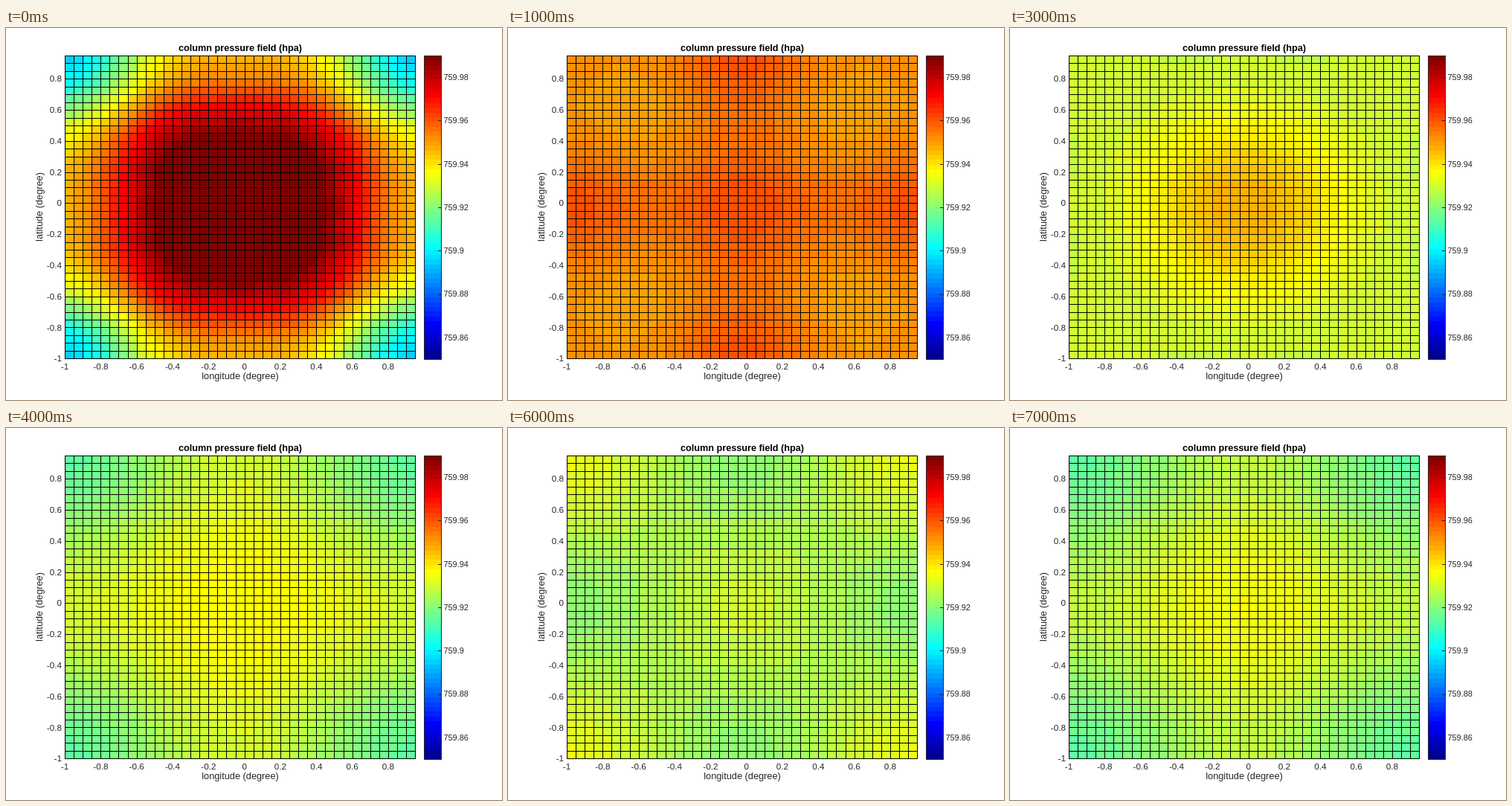
An HTML page with a canvas for the animation above (8 s loop, 667x500 px).

```html
<!DOCTYPE html>
<html lang="en">
<head>
<meta charset="utf-8">
<title>Column pressure field</title>
<style>
  html, body { margin: 0; width: 100%; height: 100%; overflow: hidden; background: #fff; }
  canvas { display: block; }
</style>
</head>
<body>
<canvas id="stage" width="667" height="500"></canvas>
<script>
const ctx = document.getElementById('stage').getContext('2d');
const STEP = 1000, STEPS = 8, CELLS = 39, LEVELS = 64;
const plot = { x: 79, y: 37, w: 471.2, h: 407.2 };
const bar = { x: 562, y: 37, w: 23, h: 408 };
const FONT = '"Liberation Sans", Arial, sans-serif';
const INK = '#262626';

const { PI, cos, exp, round, floor, min, max } = Math;
const cosDeg = degrees => cos(degrees * PI / 180);

// Rainbow from dark blue to dark red in 64 bands.
function jet(level) {
  const k = max(1, min(LEVELS, floor(level) + 1));
  const ramp = j => round(255 * max(0, min(1, j / 16, (48 - j) / 16)));
  return `rgb(${ramp(k - 24)},${ramp(k - 8)},${ramp(k + 8)})`;
}

// Damped standing waves in a square basin, in colour levels.
function pressureAt(t) {
  const mean = 34.8 + 15.2 * exp(-.17 * t * t);
  const axial = 13.3 / (1 + .65 * t) * cosDeg(107.5 * t - 25);
  const diagonal = 2.5 * (1 - exp(-t)) * cosDeg(116 * t + 10);
  const overtone = -5.5 * exp(-t) * cos(PI * t);
  return (x, y) => {
    const u = cos(PI * x), v = cos(PI * y);
    return mean + axial * (u + v) + diagonal * u * v + overtone * (u * u + v * v - 1);
  };
}

const gridX = i => round(plot.x + plot.w * i / CELLS);
const gridY = j => round(plot.y + plot.h * j / CELLS);

function text(str, x, y, size, { align = 'center', weight = '', color = INK, turn = 0 } = {}) {
  ctx.save();
  ctx.translate(x, y);
  ctx.rotate(turn);
  ctx.font = `${weight} ${size}px ${FONT}`;
  ctx.textAlign = align;
  ctx.fillStyle = color;
  ctx.fillText(str, 0, size * .35);
  ctx.restore();
}

function drawCells(step) {
  const pressure = pressureAt(step), middle = (CELLS - 1) / 2;
  for (let j = 0; j < CELLS; j++) {
    for (let i = 0; i < CELLS; i++) {
      ctx.fillStyle = jet(pressure((i - middle) / 20, (j - middle) / 20));
      ctx.fillRect(gridX(i), gridY(j), gridX(i + 1) - gridX(i), gridY(j + 1) - gridY(j));
    }
  }
}

function drawGrid() {
  const left = gridX(0), top = gridY(0);
  const width = gridX(CELLS) - left + 1, height = gridY(CELLS) - top + 1;
  ctx.fillStyle = '#000';
  for (let i = 0; i <= CELLS; i++) {
    ctx.fillRect(gridX(i), top, 1, height);
    ctx.fillRect(left, gridY(i), width, 1);
  }
}

function drawColorbar() {
  const edge = k => round(bar.y + bar.h * (1 - k / LEVELS));
  for (let k = 0; k < LEVELS; k++) {
    ctx.fillStyle = jet(k);
    ctx.fillRect(bar.x, edge(k + 1), bar.w, edge(k) - edge(k + 1));
  }
  ctx.strokeStyle = INK;
  ctx.lineWidth = 1;
  ctx.strokeRect(bar.x + .5, bar.y + .5, bar.w, bar.h);
  for (let n = 0; n < 7; n++) {
    const value = 759.86 + n * .02;
    const y = bar.y + bar.h * (759.99 - value) / .14;
    ctx.fillStyle = INK;
    ctx.fillRect(bar.x + bar.w - 4, round(y), 4, 1);
    text(String(+value.toFixed(2)), 588.5, y, 10.9, { align: 'left' });
  }
}

function drawLabels() {
  text('column pressure field (hpa)', 315, 27, 12.66, { weight: 'bold', color: '#000' });
  text('longitude (degree)', 315, 467.6, 12.75);
  text('latitude (degree)', 45, 240.5, 12.75, { turn: -PI / 2 });
  for (let n = 0; n < 10; n++) {
    const value = (n - 5) / 5, label = String(value);
    text(label, plot.x + plot.w * (value + 1) / 1.95, 455, 11.7);
    text(label, 75, plot.y + plot.h * (.95 - value) / 1.95, 11.7, { align: 'right' });
  }
}

function draw(step) {
  ctx.fillStyle = '#fff';
  ctx.fillRect(0, 0, 667, 500);
  drawCells(step);
  drawGrid();
  drawColorbar();
  drawLabels();
}

const start = performance.now();
let shown = -1;
function frame() {
  const step = floor((performance.now() - start) / STEP) % STEPS;
  if (step !== shown) draw(shown = step);
  requestAnimationFrame(frame);
}
frame();
</script>
</body>
</html>
```
